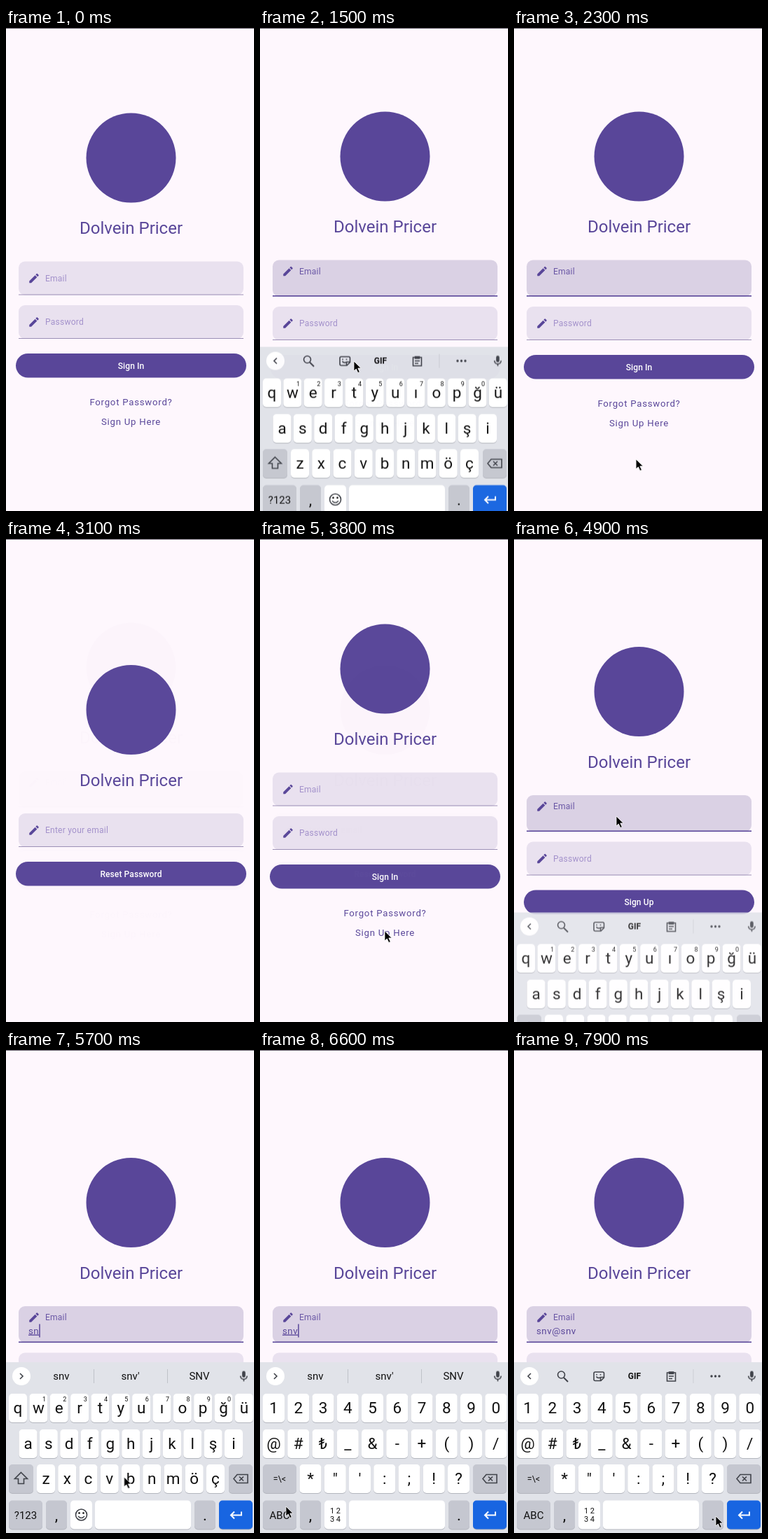
These frames come from a looping animation (354 by 690 pixels, 8000 ms). An HTML page:

```html
<!DOCTYPE html>
<html lang="en">
<head>
<meta charset="utf-8">
<title>Sign-in flow</title>
<style>
@property --f { syntax: "<number>"; inherits: true; initial-value: 0; }
html, body { margin: 0; width: 100%; height: 100%; overflow: hidden; background: #fef7fd; }
svg { display: block; width: 354px; height: 690px; font-family: Roboto, sans-serif; }
.ink { fill: #594699; }
.mid { text-anchor: middle; }
.title { font-size: 24px; }
.link { font-size: 13.2px; letter-spacing: .76px; }
.btn { font-size: 12px; font-weight: 500; letter-spacing: .1px; fill: #fff; }
.label { font-size: 12px; letter-spacing: .25px; fill: #a391cb; }
.typed { font-size: 13.3px; letter-spacing: .5px; }
.box { fill: #e9e1ef; }
.rule { fill: #9b8fb6; }

/* --f runs 0..1 as the first field takes focus and grows by 4px */
.top { transform: translateY(calc(var(--f) * -2px)); }
.low { transform: translateY(calc(var(--f) * 2px)); }
.focus .box { height: calc(48px + var(--f) * 4px); fill: color-mix(in srgb, #dad1e4 calc(var(--f) * 100%), #e9e1ef); }
.focus .rule { transform: translateY(calc(var(--f) * 3.5px)); height: calc(1px + var(--f) * .6px);
  fill: color-mix(in srgb, #594699 calc(var(--f) * 100%), #9b8fb6); }
.focus .hint { transform: translateY(calc(var(--f) * -8px)); }
.focus .label { fill: color-mix(in srgb, #6a57a5 calc(var(--f) * 100%), #a391cb); }

#signin { animation: signin 8s infinite cubic-bezier(.4,0,.2,1), focusIn 8s infinite linear; }
#reset { opacity: 0; animation: reset 8s infinite cubic-bezier(.4,0,.2,1); }
#signup { opacity: 0; animation: signup 8s infinite cubic-bezier(.4,0,.2,1), focusUp 8s infinite linear; }
#keyboard { transform: translateY(246px); animation: keyboard 8s infinite linear; }
#pointer { transform: translate(150px, 705px); animation: pointer 8s infinite ease-in-out; }

@keyframes signin { 0%, 31.25% { opacity: 1 } 40% { opacity: 0 } 48.75% { opacity: 1 } 57.5%, 100% { opacity: 0 } }
@keyframes reset { 0%, 31.25% { opacity: 0 } 40% { opacity: 1 } 48.75%, 100% { opacity: 0 } }
@keyframes signup { 0%, 48.75% { opacity: 0 } 57.5%, 100% { opacity: 1 } }
@keyframes focusIn { 0%, 14% { --f: 0 } 15.75%, 39.9% { --f: 1 } 40%, 100% { --f: 0 } }
@keyframes focusUp { 0%, 58% { --f: 0 } 60%, 100% { --f: 1 } }
@keyframes keyboard {
  0% { transform: translateY(246px); opacity: .55 }
  15.75%, 59.75% { transform: translateY(246px); opacity: .55; animation-timing-function: cubic-bezier(.333,.667,.667,1) }
  19.5%, 63.5%, 100% { transform: none; opacity: 1 }
  25% { transform: none; opacity: 1; animation-timing-function: cubic-bezier(.333,0,.667,.333) }
  28.125% { transform: translateY(246px); opacity: .55 }
}
@keyframes pointer {
  0%, 11% { transform: translate(150px, 705px) }
  13.25%, 14.5% { transform: translate(150px, 355px) }
  18.5%, 20% { transform: translate(134px, 476px) }
  23.25% { transform: translate(140px, 705px) }
  27.5% { transform: translate(170px, 705px) }
  30%, 31.5% { transform: translate(178px, 530px) }
  35.5%, 41.5% { transform: translate(178px, 705px) }
  43.75% { transform: translate(178px, 600px) }
  46%, 49% { transform: translate(178px, 560px) }
  52.5% { transform: translate(177px, 419px) }
  56.25%, 61.5% { transform: translate(146px, 396px) }
  66%, 67.5% { transform: translate(62px, 562px) }
  69.5%, 70.2% { transform: translate(207px, 610px) }
  72%, 73% { transform: translate(148px, 610px) }
  76.5%, 83% { transform: translate(37px, 652px) }
  86%, 87.5% { transform: translate(19px, 562px) }
  90%, 91.5% { transform: translate(79px, 463px) }
  97.5%, 100% { transform: translate(288px, 666px) }
}

#keyboard text { fill: #111; text-anchor: middle; }
.cap { font-size: 22.5px; }
.sup { font-size: 9px; }
.mode { font-size: 15px; }
.line { fill: none; stroke: #40434a; stroke-width: 1.6; }
</style>
</head>
<body>
<svg id="stage" viewBox="0 0 354 690"></svg>
<script>
const LOOP = 8000;
const stage = document.getElementById('stage');

const text = (x, y, cls, str) => `<text x="${x}" y="${y}" class="${cls}">${str}</text>`;
const rect = (x, y, w, h, fill, r = 0) =>
  `<rect x="${x}" y="${y}" width="${w}" height="${h}" rx="${r}" fill="${fill}"/>`;
const line = (d, extra = '') => `<path class="line" d="${d}" ${extra}/>`;
const group = (attrs, ...parts) => `<g ${attrs}>${parts.join('')}</g>`;

const PENCIL = 'M3 17.25V21h3.75L17.81 9.94l-3.75-3.75zM20.71 7.04a1 1 0 0 0 0-1.41l-2.34-2.34a1 1 0 0 0-1.41 0l-1.83 1.83 3.75 3.75z';
const MIC = 'M12 14a3 3 0 0 0 3-3V5a3 3 0 0 0-6 0v6a3 3 0 0 0 3 3zm5-3a5 5 0 0 1-10 0H5a7 7 0 0 0 6 6.9V21h2v-3.1A7 7 0 0 0 19 11z';

/* ---- app pages ---- */
function field(y, label, cls = '') {
  return group(`class="${cls}"`,
    `<path d="M18 ${y + 20}" /><rect class="box" x="18" y="${y}" width="321" height="48" rx="9"/>`,
    `<rect class="rule" x="18" y="${y + 47}" width="321" height="1"/>`,
    group('class="hint"',
      `<path class="ink" d="${PENCIL}" transform="translate(31 ${y + 15}) scale(.75)"/>`,
      text(56, y + 28, 'label', label)));
}

function page(id, cy, labels, button, links = []) {
  const [first, ...rest] = labels;
  const by = cy + 217 + 62.5 * rest.length;
  return group(`id="${id}"`,
    group('class="top"',
      `<circle class="ink" cx="178.5" cy="${cy}" r="64"/>`,
      text(178.5, cy + 108.5, 'ink mid title', 'Dolvein Pricer'),
      field(cy + 148, first, 'focus')),
    group('class="low"',
      ...rest.map((l, i) => field(cy + 210.5 + 62.5 * i, l)),
      rect(14, by, 329, 34.5, '#594699', 17.25),
      text(178.5, by + 21.5, 'mid btn', button),
      ...links.map((l, i) => text(178.5, by + 74 + 27.7 * i, 'ink mid link', l))));
}

/* ---- keyboard ---- */
const GREY = '#c5c7d0';
const key = (cx, cy, w, fill = '#fff') =>
  rect(cx - w / 2, cy - 19.5, w, 41, '#b3b6be', 5) + rect(cx - w / 2, cy - 20.5, w, 41, fill, 5);

const row = (chars, x, step, cy, w) => [...chars].map((c, i) =>
  key(x + i * step, cy, w) +
  text(x + i * step, cy + 7.5, 'cap', c.replace('&', '&amp;'))).join('');

const backspace = cx => line(`M${cx - 10} 612.5l5-6h15v12h-15zM${cx - 2} 609.5l6 6m0-6l-6 6`);

const letters = () => group('id="letters"',
  row('qwertyuıopğü', 17, 29.35, 511.5, 26),
  ...[...'1234567890'].map((d, i) => text(54.5 + i * 29.35, 501.5, 'sup', d)),
  row('asdfghjklşi', 31.5, 29.35, 562.5, 26),
  key(21.5, 612.5, 35, GREY), line('M21.5 603.5l9 9h-5v7h-8v-7h-5z'),
  row('zxcvbnmöç', 57, 30.25, 612.5, 26),
  key(335, 612.5, 34, GREY), backspace(335),
  text(28, 669.5, 'mode', '?123'),
  `<circle class="line" cx="107.5" cy="664" r="8"/>`,
  line('M103 666q4.500 5 9 0'),
  '<circle cx="104.500" cy="661.500" r="1.300"/><circle cx="110.500" cy="661.500" r="1.300"/>');

const symbols = () => group('id="symbols"',
  row('1234567890', 19.5, 35.25, 511.5, 31),
  row('@#₺_&-+()/', 19.5, 35.25, 562.5, 31),
  key(28, 612.5, 48, GREY), text(28, 617, '" font-size="12.500', '=\\&lt;'),
  row('*"\':;!?', 72, 35.25, 612.5, 31),
  key(328, 612.5, 48, GREY), backspace(328),
  text(28, 669.5, 'mode', 'ABC'),
  text(107.5, 662, '" font-size="11', '1 2'), text(107.5, 674, '" font-size="11', '3 4'));

const bottomRow = () => [
  key(28, 664, 48, GREY), key(72, 664, 30, GREY), text(72, 672, 'cap', ','),
  key(107.5, 664, 31), key(195.500, 664, 137),
  key(284, 664, 30, GREY), text(284, 672, 'cap', '.'),
  key(328, 664, 48, '#1865e1'),
  line('M336 659.500v5h-15m5-5l-5 5 5 5', 'style="stroke:#fff;stroke-width:2"')].join('');

const tools = () => group('id="tools"',
  line('M24 462l-4 4 4 4'),
  `<circle class="line" cx="67.500" cy="464" r="5"/>`, line('M71 468l6 6', 'style="stroke-width:2"'),
  line('M116 460h10.500a2 2 0 0 1 2 2v6l-4.500 4.500h-8a2 2 0 0 1-2-2v-8.500a2 2 0 0 1 2-2zM128 467.500h-4.500v5M117.500 466.500q2 3 5 1.500M118 463v1.500m5.500-1.500v1.500'),
  text(172, 470, '" font-size="12" font-weight="700', 'GIF'),
  line('M218.500 461h12v12h-12zM221.500 460h6v2.500h-6zM221 466h7m-7 3.500h5'),
  rect(255.5, 456, 1, 20, '#cdd0d6'),
  ...[282, 287.5, 293].map(x => `<circle cx="${x}" cy="466" r="1.700" fill="#40434a"/>`));

const hints = () => group('id="hints"',
  line('M20 462l4 4-4 4'),
  ...['snv', "snv'", 'SNV'].map((w, i) => text(79 + i * 98.5, 471, 'mode', w)),
  rect(125, 456, 1, 20, '#bfc2c9'), rect(230, 456, 1, 20, '#bfc2c9'));

const keyboard = () => group('id="keyboard"',
  rect(0, 446, 354, 246, '#e1e3e9'),
  '<circle cx="22" cy="466" r="13" fill="#fff"/>',
  tools(), hints(),
  `<path d="${MIC}" fill="#40434a" transform="translate(330 457) scale(.78)"/>`,
  bottomRow(), letters(), symbols());

stage.innerHTML =
  page('signin', 185.5, ['Email', 'Password'], 'Sign In', ['Forgot Password?', 'Sign Up Here']) +
  page('reset', 244, ['Enter your email'], 'Reset Password') +
  page('signup', 220, ['Email', 'Password'], 'Sign Up') +
  '<g id="entry"></g>' + keyboard() +
  rect(0, 0, 354, 1, '#69646f') +
  '<path id="pointer" d="M0 0v14l3.300-3 2.500 5.500 2.500-1.100-2.500-5.400h4.400z" fill="#000" stroke="#fff" stroke-width=".8"/>';

/* Hard on/off switching: times alternate on, off, on ... */
function show(el, ...times) {
  const frames = [[0, 0], ...times.map((t, i) => [t, 1 - i % 2]), [LOOP, 0]];
  el.animate(frames.map(([t, opacity]) => ({ offset: t / LOOP, opacity, easing: 'steps(1, end)' })),
    { duration: LOOP, iterations: Infinity });
}
const byId = id => document.getElementById(id);

show(byId('letters'), 0, 6500);
show(byId('symbols'), 6500);
show(byId('tools'), 0, 5400, 7250);
show(byId('hints'), 5400, 7250);

/* typed value, its visible span, then the caret's on/off times */
const typing = [
  ['', [5100, 5400], [5100, 5400]],
  ['s', [5400, 5600], [5400, 5600]],
  ['sn', [5600, 5800], [5600, 5800]],
  ['snv', [5800, 6950], [5800, 6300, 6500, 6950]],
  ['snv@', [6950, 7250], [6950, 7250]],
  ['snv@snv', [7250], [7250, 7750]],
];
const entry = byId('entry');
for (const [str, span, blink] of typing) {
  entry.insertAdjacentHTML('beforeend', text(32, 405.5, 'ink typed', str));
  const label = entry.lastElementChild;
  const width = str ? label.getComputedTextLength() : 0;
  const composing = str && !str.includes('@');
  if (composing) label.style.textDecoration = 'underline';
  entry.insertAdjacentHTML('beforeend', rect(32 + width, 391.5, 1.5, 19, '#594699'));
  show(label, ...span);
  show(entry.lastElementChild, ...blink);
}
</script>
</body>
</html>
```
